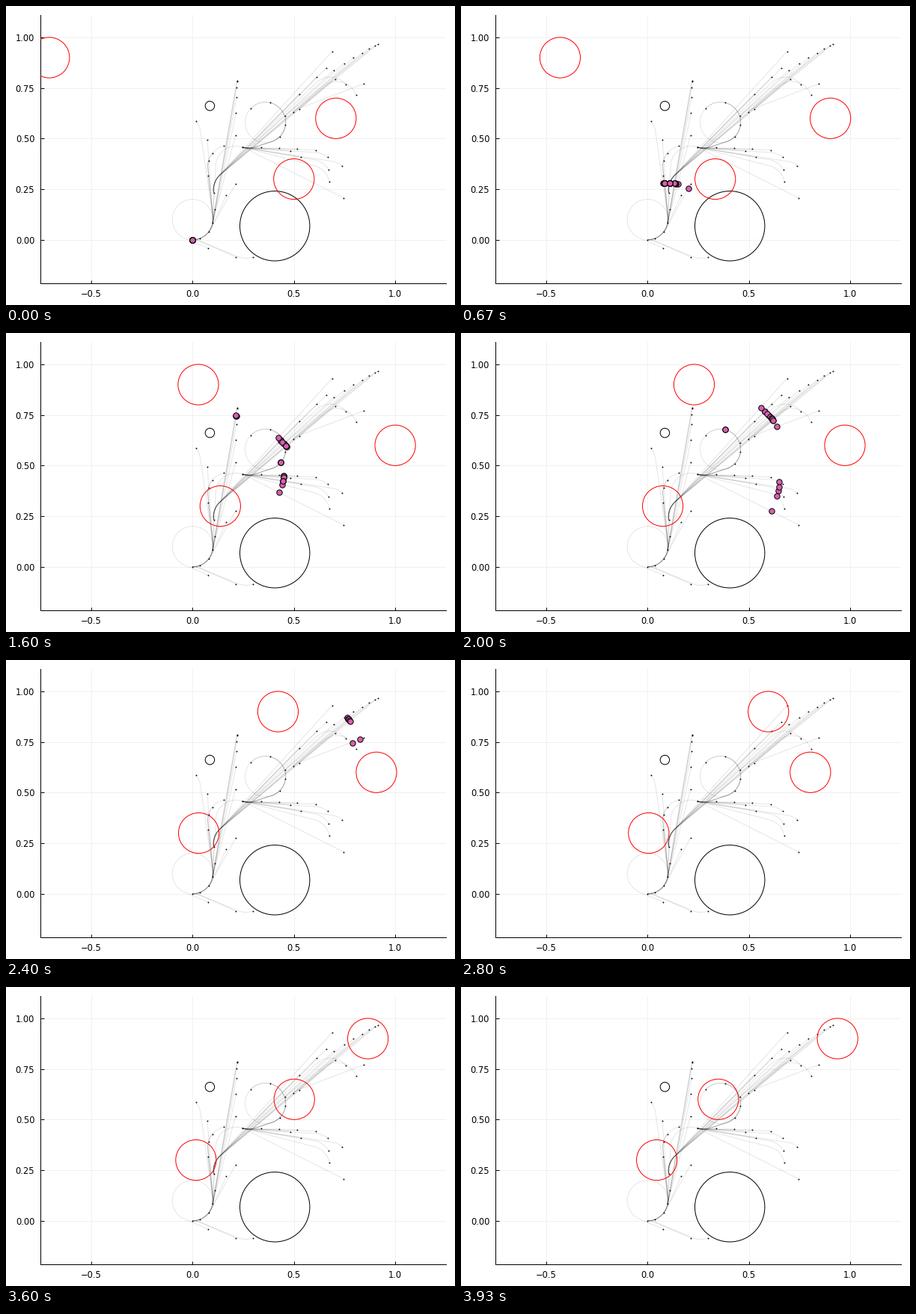
These frames come from a looping animation (600 by 400 pixels, 4 s). A matplotlib script:

```python
import numpy as np
import matplotlib.pyplot as plt
from matplotlib.animation import FuncAnimation
from matplotlib.collections import LineCollection
from matplotlib.patches import Circle

LOOP_MS, TICK_MS = 4000, 20
POSES, T_END = 60, 2.0
R = 0.1  # turning radius
PX = 0.72  # points per pixel at 100 dpi


class Edge:
    """Shortest turn-straight-turn path; the end heading (degrees) may be left free."""

    def __init__(self, parent, x, y, end=None):
        self.p1, self.h1, self.t1 = complex(x, y), 0.0, 0.0
        if parent:
            self.p0, self.h0, self.t0 = parent.p1, parent.h1, parent.t1
            self.solve(end)

    def solve(self, end):
        best = np.inf
        goal = 0.0 if end is None else np.radians(end)
        for s0 in (1, -1):
            c0 = self.p0 + 1j * s0 * R * np.exp(1j * self.h0)
            for s1 in (0,) if end is None else (1, -1):
                c1 = self.p1 + 1j * s1 * R * np.exp(1j * goal)
                v, off = c1 - c0, (s0 - s1) * R
                d = abs(v)
                if d <= abs(off):
                    continue
                phi = np.angle(v) + np.arcsin(off / d)
                run = np.sqrt(d * d - off * off)
                a, b = self.wrap(s0 * (phi - self.h0)), self.wrap(s1 * (goal - phi))
                length = R * (a + b) + run
                if length < best:
                    best = length
                    self.shape = c0, s0, R * a, phi, run, c1, s1
                    self.h1 = phi if end is None else goal
        self.t1 = self.t0 + best
        self.loops = best > 3 * abs(self.p1 - self.p0)

    @staticmethod
    def wrap(angle):
        angle %= 2 * np.pi
        return 0.0 if angle > 2 * np.pi - 1e-6 else angle

    def at(self, u):
        c0, s0, arc, phi, run, c1, s1 = self.shape
        if u < arc:
            return c0 - 1j * s0 * R * np.exp(1j * (self.h0 + s0 * u / R))
        if u < arc + run:
            return c0 + (u - arc - 1j * s0 * R) * np.exp(1j * phi)
        return c1 - 1j * s1 * R * np.exp(1j * (phi + s1 * (u - arc - run) / R))

    def curve(self):
        pts = np.array([self.at(u) for u in np.linspace(0, self.t1 - self.t0, 80)])
        return np.column_stack([pts.real, pts.imag])


edges = []


def grow(parent, *goals):
    new = [Edge(parent, *g) for g in goals]
    edges.extend(new)
    return new


def spread(a, b, n, power=1.0):
    """n goals from a to b, packed towards b when power > 1."""
    k = 1 - (1 - np.linspace(0, 1, n)[:, None]) ** power
    return np.array(a) + k * (np.array(b) - np.array(a))


def on_turn(x, y, heading, side, r=R):
    """Point where a left (1) or right (-1) turn around x, y has this heading."""
    p = complex(x, y) - 1j * side * r * np.exp(1j * np.radians(heading))
    return p.real, p.imag


root = Edge(None, 0, 0)

# trunk
_, near, stem = grow(root, *(on_turn(0, R, h, 1, 1.001 * R) for h in (20, 52, 80)))
fork, bend = grow(root, (0.104, 0.233, 98), (0.245, 0.458, -18))
grow(root, (0.016, 0.587, 130), (0.078, -0.041), (0.2115, -0.084), (0.2965, -0.085, 20))

# upward spray
grow(near, *spread((0.11, 0.151), (0.2115, 0.275), 3, 1.15))
grow(stem, *spread((0.075, 0.3175), (0.073, 0.493), 2))
grow(stem, *((*on_turn(0.175, 0.365, h, -1), h) for h in (75, 50, 12)))
grow(stem, *spread((0.2115, 0.517), (0.219, 0.787), 6, 2.3))

# diagonal spray
spine = grow(fork, *spread((0.455, 0.611), (0.525, 0.646), 3, 1.3))
grow(fork, *spread((0.525, 0.72), (0.66, 0.849), 3, 1.5))
grow(fork, *spread((0.688, 0.93), (0.7025, 0.794), 3, 1.6))
grow(fork, *spread((0.756, 0.768, -50), (0.806, 0.716, -70), 2))
for k, tip in enumerate(spread((0.747, 0.871), (0.913, 0.967), 6, 1.5)):
    grow(spine[k % 3], tip)
grow(spine[1], (0.843, 0.77))

# rightward spray and left-hand curl
grow(bend, *spread((0.337, 0.457), (0.6065, 0.444), 4))
grow(bend, *spread((0.481, 0.439), (0.5325, 0.41), 2))
grow(bend, *spread((0.6655, 0.408, -40), (0.675, 0.286, -80), 3))
grow(bend, (0.739, 0.3655, -40), (0.745, 0.207))
grow(bend, *((*on_turn(0.359, 0.58, h, 1), h) for h in (45, 82, 167, 225)))

fig = plt.figure(figsize=(6, 4), dpi=100, facecolor="white")
ax = fig.add_axes([46.2 / 600, 28.7 / 400, 541.7 / 600, 359.7 / 400])
ax.set(xlim=(-0.75, 1.25), ylim=(-0.216, 1.112),
       xticks=np.arange(-0.5, 1.1, 0.5), yticks=np.arange(0, 1.1, 0.25))
ax.set_axisbelow(True)
ax.grid(color="#f0f0f0", lw=PX)
ax.spines[["top", "right"]].set_visible(False)
ax.spines[["left", "bottom"]].set_linewidth(PX)
ax.tick_params(direction="in", length=4.5 * PX, width=PX, pad=5.2,
               labelsize=8.3, labelfontfamily="DejaVu Sans")
ax.tick_params(axis="y", pad=5.7)


def ring(x, y, r=R, color="black", alpha=1.0, z=3):
    return ax.add_patch(Circle((x, y), r, fill=False, ec=color, lw=PX,
                               alpha=alpha, zorder=z))


ax.add_collection(LineCollection([e.curve() for e in edges], colors="black",
                                 alpha=0.1, linewidths=PX, zorder=2), autolim=False)
ring(0.359, 0.58, alpha=0.1, z=2)

dots = np.array([root.p1] + [e.p1 for e in edges])
ax.plot(dots.real, dots.imag, "o", color="black", ms=1.9 * PX, mew=0,
        zorder=2.5, snap=False)

ring(0.4057, 0.0683, 0.1724)
ring(0.0853, 0.6615, 0.023)
movers = [
    (ring(0, 0.9, color="red"), lambda t: np.sin(t - np.pi / 4)),
    (ring(0, 0.6, color="red"), lambda t: np.sin(t + np.pi / 4)),
    (ring(0, 0.3, color="red"), lambda t: 0.5 - 0.5 * np.sin(t)),
]
agents, = ax.plot([], [], "o", mfc="#d95fb0", mec="black", ms=7.4 * PX,
                  mew=PX, zorder=4, snap=False)


def update(i):
    # fine ticks keep the 15 Hz steps close to their uneven 60/70 ms slots
    pose = int((i + 0.75) * TICK_MS * POSES / LOOP_MS)
    t = T_END * pose / (POSES - 1)
    for disc, path in movers:
        disc.center = path(t), disc.center[1]
    pos = np.array([e.at(t - e.t0) for e in edges
                    if e.t0 <= t <= e.t1 and not e.loops], dtype=complex)
    agents.set_data(pos.real, pos.imag)
    return [agents] + [disc for disc, _ in movers]


anim = FuncAnimation(fig, update, frames=LOOP_MS // TICK_MS, interval=TICK_MS,
                     repeat=True, repeat_delay=0, blit=False)
plt.show()
```
